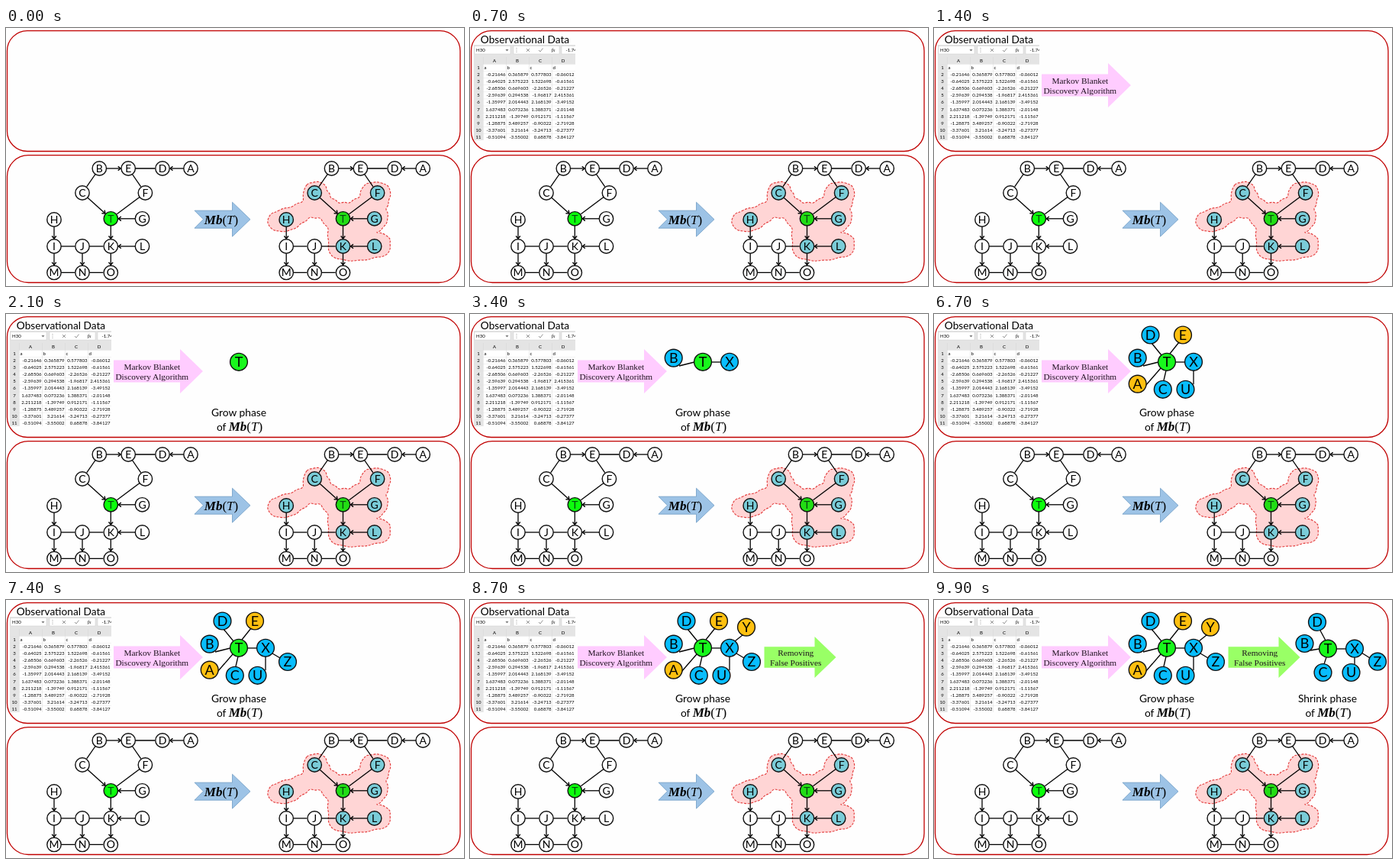
An HTML page for the animation above (10 s loop, 600 by 338 pixels).

```html
<!DOCTYPE html>
<html lang="en">
<head>
<meta charset="utf-8">
<title>Markov blanket discovery</title>
<style>
  html, body { margin: 0; width: 100%; height: 100%; overflow: hidden; background: #fff; }
  svg { display: block; width: 600px; height: 338px; font-family: Lato, Carlito, sans-serif; }
  text { text-anchor: middle; }
  .panel { fill: #fefefe; stroke: #c00000; stroke-width: 1.3; }
  .edge { stroke: #000; stroke-width: 1.3; fill: none; }
  .node { stroke: #111; stroke-width: 1.4; }
  .serif { font: 11.3px "Liberation Serif", "Times New Roman", serif; fill: #1c101c; }
  .math { font-family: "Liberation Serif", "Times New Roman", serif; font-size: 17px; }
  .cell { font-size: 6.1px; fill: #000; }
</style>
</head>
<body>
<svg id="stage" viewBox="0 0 600 338">
  <defs>
    <marker id="tip" markerUnits="userSpaceOnUse" markerWidth="8" markerHeight="8" refX="5" refY="4" orient="auto">
      <path d="M1.5 1.2L5 4L1.5 6.8" fill="none" stroke="#000" stroke-width="1.4"/>
    </marker>
    <clipPath id="sheet"><rect x="5" y="22" width="133" height="125"/></clipPath>
  </defs>
  <rect class="panel" x="1.5" y="3.7" width="593.5" height="157.8" rx="26.3"/>
  <rect class="panel" x="1.5" y="166.7" width="593.5" height="166.8" rx="27.8"/>
</svg>
<script>
const stage = document.getElementById("stage");
const BLUE = "#08bdff", ORANGE = "#ffc010", GREEN = "#18f81c";

const text = (x, y, s, size, attrs = "") =>
  `<text x="${x}" y="${y}" ${size ? `font-size="${size}"` : ""} ${attrs}>${s}</text>`;
const box = (x, y, w, h, fill, stroke = "none") =>
  `<rect x="${x}" y="${y}" width="${w}" height="${h}" fill="${fill}" stroke="${stroke}" stroke-width=".5"/>`;
const line = (x1, y1, x2, y2, attrs = "") =>
  `<path class="edge" d="M${x1} ${y1}L${x2} ${y2}" ${attrs}/>`;
const node = (s, x, y, r, fill, size, ink = "#000") =>
  `<circle class="node" cx="${x}" cy="${y}" r="${r}" fill="${fill}"/>` +
  text(x, y + size * .36, s, size, `fill="${ink}"`);
const mb = '<tspan class="math"><tspan font-weight="bold" font-style="italic">Mb</tspan>(<tspan font-style="italic">T</tspan>)</tspan>';

// Block arrow: body half-height b, head half-height h, head starting at x = neck
const arrow = (x, neck, end, y, b, h, attrs, notch = 0) =>
  `<path d="M${x} ${y - b}H${neck}V${y - h}L${end} ${y}L${neck} ${y + h}V${y + b}H${x}L${x + notch} ${y}Z" ${attrs}/>`;

const caption = (x, title) => text(x, 133.5, title, 13.8) + text(x + 1, 152.5, "of " + mb, 13.8);

// Lower panel: the network, plain and with its blanket
const places = {
  B: [122.3, 184], E: [160.2, 184], D: [205, 184], A: [242, 184], C: [100, 216], F: [182.4, 216],
  T: [137.3, 249.8], G: [178.5, 249.8], H: [63, 251], I: [63, 286], J: [100, 286], K: [137.3, 286],
  L: [178.5, 286], M: [63, 320.4], N: [100, 320.4], O: [137.3, 320.4]
};
const links = "B-C B>E E-D A>D E-F C>T F-T G>T T>K L>K H>I I-J J-K I>M J>N K>O M-N N-O".split(" ");

function network(dx, members, fill, target) {
  let out = "";
  for (const [a, kind, b] of links) {
    const [x1, y1] = places[a], [x2, y2] = places[b];
    const k = 1 - 10 / Math.hypot(x2 - x1, y2 - y1);
    out += line(x1, y1, x1 + (x2 - x1) * k, y1 + (y2 - y1) * k, kind === ">" ? 'marker-end="url(#tip)"' : "");
  }
  for (const s in places) {
    const [x, y] = places[s];
    const paint = s === "T" ? target : members.includes(s) ? fill : "#fff";
    out += node(s, x, y, 9.2, paint, 14, s === "T" ? "#064a10" : "#000");
  }
  return `<g transform="translate(${dx})">${out}</g>`;
}

function blanket() {
  const corners = [[392, 208], [402, 202.5], [415, 203.5], [420, 213], [425, 223], [436, 230], [450, 230],
    [464, 222], [468, 208], [478, 203], [495, 204], [503, 212], [501, 226], [497, 237], [500, 249], [494, 261],
    [484, 268], [500, 273], [503, 282], [500, 296], [484, 300], [462, 304], [440, 303], [425, 297], [423, 280],
    [423, 262], [412, 248], [398, 247], [386, 256], [374, 264], [357, 266], [345, 260], [344, 248], [354, 241],
    [374, 235], [390, 228]];
  // A small outward bump in the middle of each side makes the wavy rim
  const p = corners.flatMap(([x, y], i) => {
    const [nx, ny] = corners[(i + 1) % corners.length];
    const k = 2.2 / Math.hypot(nx - x, ny - y);
    return [[x, y], [(x + nx) / 2 + (ny - y) * k, (y + ny) / 2 - (nx - x) * k]];
  });
  const mid = i => {
    const a = p[i % p.length], b = p[(i + 1) % p.length];
    return `${(a[0] + b[0]) / 2} ${(a[1] + b[1]) / 2}`;
  };
  let d = "M" + mid(0);
  for (let i = 1; i <= p.length; i++) d += `Q${p[i % p.length].join(" ")} ${mid(i)}`;
  return `<path d="${d}Z" fill="#ffd5d5" stroke="#e33b3b" stroke-width="1.1" stroke-dasharray="3 1.6"/>`;
}

// Spreadsheet excerpt
function sheet() {
  const rows = [
    "-0.21646 0.365879 0.577803 -0.06012", "-0.64025 2.575223 1.522698 -0.61561",
    "-2.68506 0.669603 -2.26526 -0.21227", "-2.59639 0.294538 -1.96817 2.415361",
    "-1.35997 2.014443 2.168139 -3.49152", "1.637483 0.073236 1.388371 -2.01148",
    "2.211218 -1.39749 0.912171 -1.11567", "-1.28875 3.489257 -0.90322 -2.71928",
    "-3.37601 3.21614 -3.24713 -0.27377", "-0.51094 -3.55002 0.68878 -3.84127"
  ].map(r => r.split(" "));
  const cell = (x, y, s, anchor = "middle") => text(x, y, s, 0, `class="cell" style="text-anchor:${anchor}"`);
  const rowY = i => 47.4 + i * 9.07;
  let out = box(5, 22, 133, 125, "#fff") + box(5, 22, 133, 25.4, "#e4e4e4") + box(5, 47, 12, 100, "#e4e4e4") +
    box(6, 23.5, 47, 10.5, "#fff", "#ccc") + box(57, 23.5, 60, 10.5, "#fff", "#ccc") +
    box(120, 23.5, 25, 10.5, "#fff", "#ccc") +
    cell(8, 31, "H30", "start") + cell(125.5, 31, "-1.74", "start") +
    '<path d="M46.5 28h4l-2 2.5z" fill="#777"/><path d="M61 26v6" stroke="#999" stroke-dasharray="1 1.4"/>' +
    '<path d="M74 27l4 4m0-4l-4 4M90 29l2 2 3.5-4.5" fill="none" stroke="#888" stroke-width=".9"/>' +
    text(109, 31, "fx", 6.5, 'font-style="italic" font-family="Liberation Serif, serif"');
  for (let c = 0; c < 4; c++) {
    const x = 17 + c * 30;
    out += box(x, 38, .5, 109, "#d6d6d6") + cell(x + 15, 45, "ABCD"[c]) + cell(x + 1.5, rowY(0) + 6.7, "abcd"[c], "start");
  }
  for (let i = 0; i < 11; i++) {
    out += box(5, rowY(i), 133, .4, "#dedede") + cell(11, rowY(i) + 6.7, i + 1);
    if (i) rows[i - 1].forEach((v, c) => out += cell(46.5 + c * 30, rowY(i) + 6.7, v, "end"));
  }
  return text(72, 20, "Observational Data", 13.7) + `<g clip-path="url(#sheet)">${out}</g>`;
}

// Upper graph: [start, letter, x, y, fill, edge to its neighbour]
const grown = [
  [2000, "T", 305, 62.8, GREEN],
  [2700, "B", 266.7, 57.6, BLUE, [274, 68, 294, 63]],
  [3300, "X", 340, 62.8, BLUE, [317, 63, 328, 63]],
  [4000, "A", 266.7, 91.6, ORANGE, [277, 94, 297, 71]],
  [4700, "D", 283.5, 27.5, BLUE, [285, 38, 298, 54]],
  [5300, "U", 329.5, 98.8, BLUE, [340, 74, 340, 92]],
  [6000, "C", 299.8, 98.8, BLUE, [301, 87, 304, 74]],
  [6700, "E", 326, 27.5, ORANGE, [321, 37, 309, 52]],
  [7300, "Z", 369, 81, BLUE, [349, 70, 359, 76]],
  [8000, "Y", 362, 35.6, ORANGE, [357, 46, 347, 54]]
];
const shrunk = [
  ["T", 516, 63.7, GREEN],
  ["B", 485.5, 57, BLUE, [493, 66, 505, 64]],
  ["X", 551, 63.7, BLUE, [528, 64, 540, 64]],
  ["D", 502, 29, BLUE, [506, 40, 513, 53]],
  ["C", 509.5, 95, BLUE, [511, 84, 514, 75]],
  ["U", 546.5, 95, BLUE, [551, 74, 551, 88]],
  ["Z", 581, 80.7, BLUE, [560, 69, 571, 76]]
].map(n => [9300, ...n]);

const step = (at, body) => `<g data-at="${at}" display="none">${body}</g>`;
const graph = [...grown, ...shrunk];

stage.insertAdjacentHTML("beforeend",
  network(0, "", "", "#0cff0c") +
  arrow(247, 296.5, 320, 250.7, 11.5, 22.5, 'fill="#9dc3e6" stroke="#6f9cc4" stroke-width=".8"', 11.5) +
  text(282, 256.5, mb, 17) +
  blanket() + network(304.2, "CFGHKL", "#7accd8", "#22dd14") +
  step(700, sheet()) +
  step(1400, arrow(141, 228, 258, 75, 14.5, 29, 'fill="#ffccff"') +
    text(191.3, 73, "Markov Blanket", 0, 'class="serif"') +
    text(191.3, 86.3, "Discovery Algorithm", 0, 'class="serif"')) +
  step(2000, caption(305, "Grow phase")) +
  step(8700, arrow(385.5, 451.5, 479.5, 75, 13.7, 27, 'fill="#99ff66"') +
    text(426.7, 73, "Removing", 0, 'class="serif"') +
    text(426.7, 86.3, "False Positives", 0, 'class="serif"')) +
  step(9300, caption(515.5, "Shrink phase")) +
  graph.map(([at, , , , , e]) => e ? step(at, line(...e)) : "").join("") +
  graph.map(([at, s, x, y, fill]) => step(at, node(s, x, y, 11.4, fill, 18))).join(""));

const steps = [...stage.querySelectorAll("[data-at]")];
const start = performance.now();
function draw() {
  const t = (performance.now() - start) % 10000;
  for (const g of steps) g.setAttribute("display", t >= +g.dataset.at ? "inline" : "none");
  requestAnimationFrame(draw);
}
draw();
</script>
</body>
</html>
```
